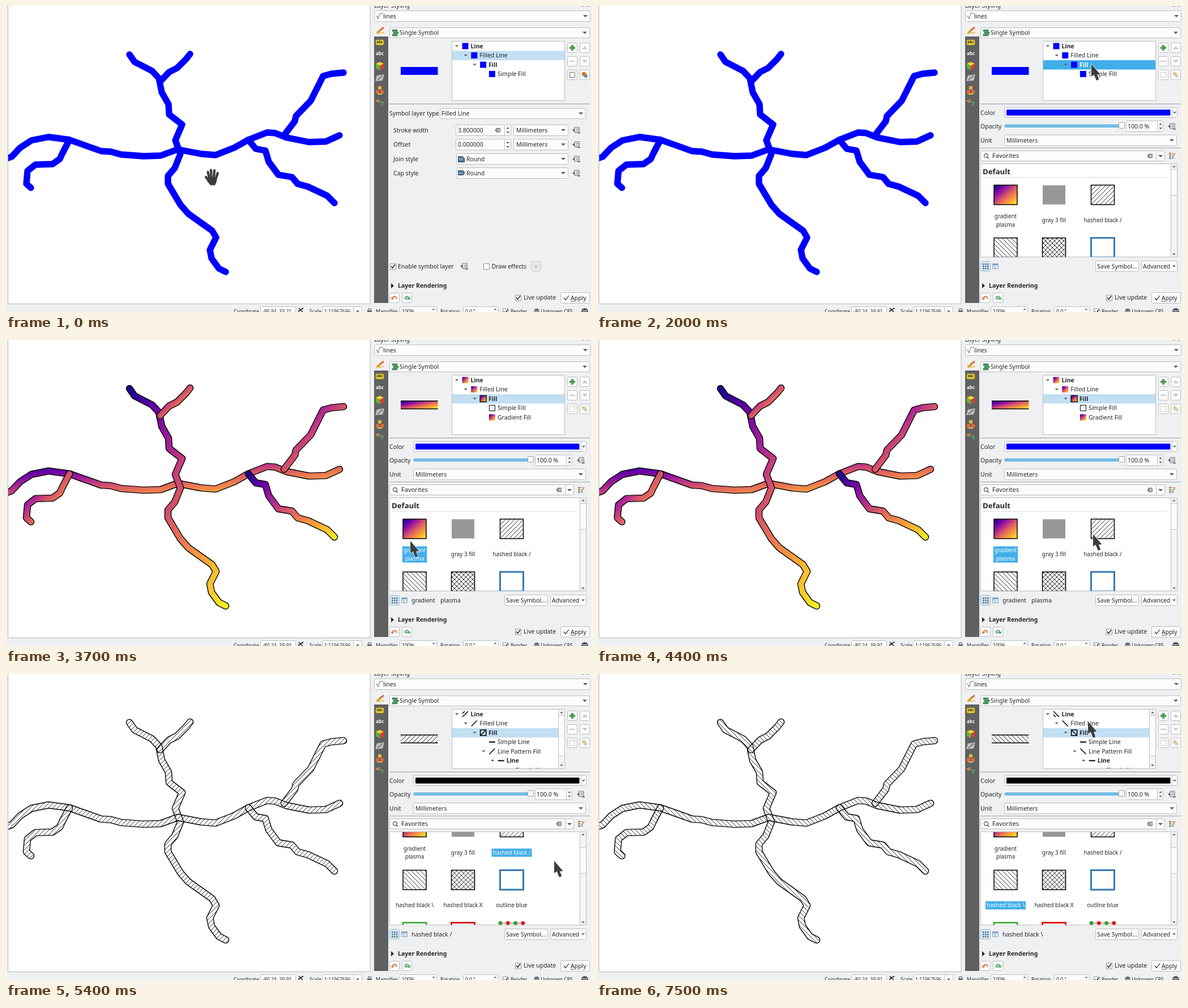
Write an HTML page with a canvas that moves like this. It is 1033 by 542 pixels and loops after 8000 ms.

```html
<!DOCTYPE html>
<html lang="en">
<head>
<meta charset="utf-8">
<title>Line styling</title>
<style>
html, body { margin: 0; width: 100%; height: 100%; overflow: hidden; background: #eff0f1; }
canvas { display: block; }
</style>
</head>
<body>
<canvas id="stage" width="1033" height="542"></canvas>
<script>
const W = 1033, H = 542, LOOP = 8000;
const stage = document.getElementById('stage').getContext('2d');
let g = stage;

const INK = '#232629', EDGE = '#bcbec0', BLUE = '#0000ff', ACCENT = '#41aeea', PALE = '#c2dff3';
const PLASMA = [[0, '#0d0887'], [.2, '#6a00a8'], [.38, '#b12a90'], [.5, '#d55468'],
  [.62, '#ea7853'], [.78, '#fca636'], [1, '#f0f921']];

// Rivers as flat x, y lists
const main = [-4,272, 10,267, 25,251, 45,238, 75,232, 112,237, 168,257, 185,258, 203,263, 243,266, 273,265,
  303,254, 345,262, 370,264, 403,251, 428,237, 461,224, 475,225, 495,233, 535,241, 565,240, 589,229];
const north = [218,86, 227,99, 258,115, 270,128, 275,153, 287,174, 288,192, 311,210, 299,238, 308,262, 298,287,
  286,301, 286,315, 308,352, 322,368, 364,398, 371,410, 360,432, 363,447, 376,465, 388,471];
const fork = [325,85, 318,94, 302,110, 288,117, 272,134];
const east = [596,118, 575,120, 560,124, 538,168, 512,195, 510,204, 491,229];
const south = [428,237, 441,253, 458,256, 464,276, 481,299, 505,303, 515,315, 533,320, 567,336, 580,349];
const west = [112,237, 99,262, 95,271, 82,280, 52,281, 38,292, 36,315, 44,322];
const rivers = [main, north, fork, east, south, west];

// Pointer stops: time, x, y
const stops = [[100,364,302], [1000,903,79], [1200,901,79], [1400,875,98], [1600,873,103], [2200,873,103],
  [2600,709,374], [2700,711,366], [3600,711,366], [3700,714,356], [4100,800,408], [4500,890,332], [4700,890,332],
  [5200,968,331], [5600,968,331], [6100,719,363], [6700,719,363], [7100,855,103], [7300,855,103], [7500,867,84]];

function pointerAt(t) {
  const i = stops.findIndex(s => s[0] > t);
  if (i === 0) return stops[0].slice(1);
  if (i < 0) return stops[stops.length - 1].slice(1);
  const [t0, x0, y0] = stops[i - 1], [t1, x1, y1] = stops[i];
  const u = (t - t0) / (t1 - t0), k = u * u * (3 - 2 * u);
  return [x0 + (x1 - x0) * k, y0 + (y1 - y0) * k];
}

function layer(w, h, paint) {
  const c = document.createElement('canvas'), outer = g;
  c.width = w; c.height = h;
  g = c.getContext('2d');
  paint();
  g = outer;
  return c;
}

function box(x, y, w, h, fill, stroke, width = 1, radius = 0) {
  g.beginPath();
  g.roundRect(x, y, w, h, radius);
  if (fill) { g.fillStyle = fill; g.fill(); }
  if (stroke) { g.strokeStyle = stroke; g.lineWidth = width; g.stroke(); }
}
function line(points, color = INK, width = 1, close = false) {
  g.beginPath();
  for (let i = 0; i < points.length; i += 2) g.lineTo(points[i], points[i + 1]);
  if (close) g.closePath();
  g.strokeStyle = color; g.lineWidth = width; g.stroke();
}
function poly(points, color) {
  g.beginPath();
  for (let i = 0; i < points.length; i += 2) g.lineTo(points[i], points[i + 1]);
  g.fillStyle = color; g.fill();
}
function dot(x, y, r, color) {
  g.beginPath(); g.arc(x, y, r, 0, 7); g.fillStyle = color; g.fill();
}
function text(s, x, y, { size = 10.5, bold = false, color = INK, align = 'left' } = {}) {
  g.font = `${bold ? 'bold ' : ''}${size}px "Noto Sans", sans-serif`;
  g.textAlign = align; g.fillStyle = color;
  g.fillText(s, x, y + size * .36);
}
function clipped(x, y, w, h, paint) {
  g.save();
  g.beginPath(); g.rect(x, y, w, h); g.clip();
  paint();
  g.restore();
}
const arrow = (x, y, d = 1, r = 4, color = '#55585b') => poly([x - r, y - d * r / 2, x + r, y - d * r / 2, x, y + d * r / 2], color);
const field = (x, y, w, h = 19) => box(x + .5, y + .5, w - 1, h - 1, '#fcfcfc', EDGE, 1, 2);
function combo(label, x, y, w, textX, h = 19) {
  field(x, y, w, h);
  text(label, textX, y + h / 2);
  arrow(x + w - 9, y + h / 2);
}
function checkbox(x, y, on) {
  box(x - 4.5, y - 4.5, 10, 10, '#fcfcfc', '#8f9294');
  if (on) line([x - 3, y, x - .5, y + 3, x + 4, y - 3], INK, 1.6);
}
function overrideIcon(x, y) {
  box(x - 3, y - 5, 8, 9, '#f7f7f7', '#606366');
  line([x - 1, y - 2, x + 4, y - 2], '#606366');
  line([x - 1, y + 1, x + 4, y + 1], '#606366');
  poly([x - 7, y, x - 3, y - 3, x - 3, y + 3], '#606366');
  line([x + 2, y + 5, x + 7, y + 5], '#606366', 1.5);
}

// Fills
function plasma(x, y, w, h) {
  const gx = .5 / w, gy = .5 / h, n = gx * gx + gy * gy;
  const fill = g.createLinearGradient(x, y, x + gx / n, y + gy / n);
  PLASMA.forEach(([at, color]) => fill.addColorStop(at, color));
  return fill;
}
function hatch(kind) {
  return g.createPattern(layer(8, 8, () => {
    if (kind === 'back') { g.translate(8, 0); g.scale(-1, 1); }
    for (const s of [0, 8, 16]) line([s - 10, 10, s + 2, -2].map((v, i) => i % 2 ? v : v), INK, 1);
  }), 'repeat');
}
function paintHatch(x, y, w, h, kinds) {
  clipped(x, y, w, h, () => kinds.forEach(k => { g.fillStyle = hatch(k); g.fillRect(x, y, w, h); }));
}

// River maps, one per style
function strokeRiver(points, style, width) {
  g.lineCap = g.lineJoin = 'round';
  line(points, style, width);
}
function riverMap(style) {
  return layer(W, H, () => rivers.forEach(points => {
    if (style === 'blue') return strokeRiver(points, BLUE, 11.4);
    const part = layer(W, H, () => {
      strokeRiver(points, '#000', 12.6);
      g.globalCompositeOperation = 'destination-out';
      strokeRiver(points, '#000', 9.8);
      g.globalCompositeOperation = 'destination-over';
      let fill;
      if (style === 'plasma') {
        const xs = points.filter((_, i) => i % 2 === 0), ys = points.filter((_, i) => i % 2);
        const x = Math.min(...xs) - 6, y = Math.min(...ys) - 6;
        fill = plasma(x, y, Math.max(...xs) + 6 - x, Math.max(...ys) + 6 - y);
      } else fill = hatch(style);
      strokeRiver(points, fill, 11);
    });
    g.drawImage(part, 0, 0);
  }));
}
const maps = {};
for (const style of ['blue', 'plasma', 'slash', 'back']) maps[style] = riverMap(style);

function drawMap(style) {
  box(3.5, -2, 639.5, 529.5, '#fff', '#b4b6b8');
  clipped(4, 0, 639, 527, () => g.drawImage(maps[style], 0, 0));
}

function drawToolStrip() {
  box(650, 54, 25, 472, '#5f6061');
  line([655, 48, 661, 43], '#d9a520', 4);
  line([660, 43, 667, 38], '#d8683c', 3);
  line([654, 49, 668, 47], '#e3bb4b', 1.5);
  box(653, 60, 14, 9, '#f4d93a', '#b79b1b', 1, 2);
  text('abc', 660, 64, { size: 6.5, bold: true, align: 'center' });
  text('abc', 660, 84, { size: 8, bold: true, color: '#fff', align: 'center' });
  poly([660, 99, 667, 102, 660, 106, 653, 102], '#f3d42d');
  poly([653, 102, 660, 106, 660, 114, 653, 110], '#55b83d');
  poly([667, 102, 660, 106, 660, 114, 667, 110], '#dc3d33');
  poly([655, 123, 668, 121, 665, 132, 652, 133], '#bfc1c2');
  line([656, 131, 665, 123], '#77797b', 2);
  box(657, 142, 6, 6, '#e9b13d'); box(653, 149, 6, 6, '#dd6a35'); box(661, 149, 6, 6, '#dd6a35');
  line([656, 156, 664, 156], '#e7c64a', 2);
  line([660, 166, 654, 168, 659, 171], '#e08a3e', 2);
  line([660, 169, 666, 171, 663, 176], '#5caa65', 2);
}

function symbolIcon(x, y, style, framed) {
  const l = x - 5.5, t = y - 5.5;
  if (style === 'blue') return box(l, t, 11, 11, BLUE);
  if (style === 'plasma') return box(l, t, 11, 11, plasma(l, t, 11, 11), framed && '#000', 1.4);
  const d = style === 'slash' ? 1 : -1;
  if (framed) box(l + .5, t + .5, 10, 10, null, '#000', 1.6);
  line([x - 5 * d, y + 5, x + 5 * d, y - 5], '#000', 1.5);
}

function drawTree(style, row, strong) {
  box(787.5, 62.5, 199, 105, '#fff', EDGE);
  const hatched = style === 'slash' || style === 'back';
  const rowY = i => 71 + 16.5 * i, right = hatched ? 975 : 986;
  box(788, rowY(row) - 8, right - 788, 16.5, strong ? ACCENT : PALE);
  clipped(788, 63, right - 788, 104.5, () => {
    const entry = (label, i, depth, icon, bold, open = true) => {
      const x = 811 + 15.8 * depth, y = rowY(i);
      if (open) arrow(x - 15, y, 1, 3.2);
      icon(x, y);
      text(label, x + 9.5, y, { bold, color: strong && i === row ? '#fff' : INK });
    };
    const symbol = framed => (x, y) => symbolIcon(x, y, style, framed);
    const dash = (x, y) => line([x - 5.5, y, x + 5.5, y], '#000', 1.8);
    entry('Line', 0, 0, (x, y) => {
      symbol(false)(x, y);
      if (hatched) { const d = style === 'slash' ? 1 : -1; line([x - 5, y - d * 1, x - 1, y - d * 5], '#000', 1.5); }
    }, true);
    entry('Filled Line', 1, 1, symbol(false));
    entry('Fill', 2, 2, symbol(true), true);
    if (style === 'blue') entry('Simple Fill', 3, 3, symbol(false), false, false);
    else if (style === 'plasma') {
      entry('Simple Fill', 3, 3, (x, y) => box(x - 5, y - 5, 10, 10, '#fff', '#000'), false, false);
      entry('Gradient Fill', 4, 3, symbol(false), false, false);
    } else {
      entry('Simple Line', 3, 3, dash, false, false);
      entry('Line Pattern Fill', 4, 3, symbol(false));
      entry('Line', 5, 4, dash, true);
      entry('Simple Line', 6, 5, dash, false, false);
    }
  });
  if (hatched) {
    box(975.5, 62.5, 11, 105, '#f5f5f5', EDGE);
    box(975.5, 73.5, 11, 72, '#fcfcfc', EDGE);
    arrow(981, 68, -1, 2.8); arrow(981, 162, 1, 2.8);
  }
}

function drawPreview(style) {
  const x = 697, y = 108, w = 65.5, h = 14;
  if (style === 'blue') return box(x, y, w, h, BLUE);
  if (style === 'plasma') box(x, y, w, h, plasma(x, y, w, h));
  else paintHatch(x, y, w, h, [style]);
  line([x, y, x + w, y], '#000', 1.6);
  line([x, y + h, x + w, y + h], '#000', 1.6);
}

function drawTreeButtons(locked) {
  for (const x of [1000, 1022]) for (const y of [74, 98, 122]) field(x - 9, y - 9, 18, 18);
  line([995, 74, 1005, 74], '#4f9f51', 4); line([1000, 69, 1000, 79], '#4f9f51', 4);
  line([995, 98, 1005, 98], '#cfd1d2', 2.5);
  arrow(1022, 74, -1, 5, '#c3c5c7'); arrow(1022, 98, 1, 5, '#c3c5c7');
  g.globalAlpha = locked ? .3 : 1;
  box(995.5, 117.5, 9, 9, '#fff', '#65686b'); box(1002, 116, 3, 3, '#e2b936');
  dot(1021, 121, 4.5, '#e2b936'); dot(1020, 120, 2.5, '#d84a3f'); dot(1024, 124, 3, '#4f8bc4');
  g.globalAlpha = 1;
}

function drawLinePanel() {
  text('Symbol layer type', 677, 190.5);
  combo('Filled Line', 766, 181, 258, 769);
  [['Stroke width', 220, '3.800000'], ['Offset', 245.5, '0.000000']].forEach(([label, y, value], i) => {
    text(label, 684, y);
    field(794, y - 10, 98, 20);
    text(value, 798, y);
    line([880.5, y - 9, 880.5, y + 9], EDGE);
    arrow(886, y - 4, -1, 2.8); arrow(886, y + 4, 1, 2.8);
    if (!i) clearIcon(868, y);
    combo('Millimeters', 896, y - 10, 97, 901, 20);
    overrideIcon(1007, y);
  });
  [['Join style', 271], ['Cap style', 296]].forEach(([label, y], i) => {
    text(label, 684, y);
    combo('Round', 795, y - 10, 198, 813, 20);
    box(798.5, y - 4.5, 11, i ? 8 : 10, '#55799b', '#34495e', 1, i ? [0, 4, 4, 0] : [0, 5, 0, 0]);
    line([799, y, 807, y], '#c9dbe8');
    overrideIcon(1007, y);
  });
  checkbox(683, 461, true); text('Enable symbol layer', 692, 461);
  overrideIcon(809, 461);
  checkbox(848, 461, false); text('Draw effects', 857.5, 461);
  box(927.5, 452.5, 17, 17, '#e8e9ea', '#c8cacb', 1, 2);
  text('★', 936, 461, { size: 11, color: '#c9c4ae', align: 'center' });
}

function clearIcon(x, y) {
  poly([x - 5, y, x - 2, y - 4, x + 5, y - 4, x + 5, y + 4, x - 2, y + 4], '#8b8e91');
  line([x, y - 2, x + 3.5, y + 2], '#fff'); line([x, y + 2, x + 3.5, y - 2], '#fff');
}

const columns = [721.5, 807, 893];
function drawSwatches(scroll, chosen) {
  box(677.5, 279.5, 347, 165, '#fff', EDGE);
  clipped(678, 280, 336, 164.5, () => {
    g.translate(0, -scroll);
    text('Default', 681, 293.5, { size: 13.2, bold: true });
    line([681, 303.5, 1008, 303.5], '#dcddde');
    const [a, b, c] = columns, rows = [334.5, 428, 521.5];
    const frame = (x, y, fill, color = '#000', width = 1.5) => box(x - 20.5, y - 17.2, 41, 34.4, fill, color, width);
    const hatched = (x, y, kinds) => { paintHatch(x - 20.5, y - 17, 41, 34, kinds); frame(x, y); };
    frame(a, rows[0], plasma(a - 20, rows[0] - 17, 41, 34));
    box(b - 20, rows[0] - 17, 40, 34, '#979797');
    hatched(c, rows[0], ['slash']);
    hatched(a, rows[1], ['back']);
    hatched(b, rows[1], ['slash', 'back']);
    frame(c, rows[1], '#fff', '#3579b1', 3);
    frame(a, rows[2] - .5, '#fff', '#4daf4a', 3);
    frame(b, rows[2] - .5, '#fff', '#e31a1c', 3);
    box(c - 20, rows[2] - 17, 40, 34, null, '#555');
    for (let i = 0; i < 4; i++) dot(c - 20 + i * 13.3, rows[2] - 17, 3.4, i % 2 ? '#e31a1c' : '#33a02c');

    const label = (name, x, y, lines) => {
      const on = name === chosen, size = 9.9;
      g.font = `${size}px "Noto Sans", sans-serif`;
      if (on) {
        const w = Math.max(...lines.map(s => g.measureText(s).width)) + 4, h = lines.length * 14.4;
        box(x - w / 2, y - h / 2, w, h, ACCENT);
      }
      lines.forEach((s, i) => text(s, x, y + (i - (lines.length - 1) / 2) * 14.4, { size, align: 'center', color: on ? '#fff' : INK }));
    };
    label('plasma', a, 379.8, ['gradient', 'plasma']);
    label('gray', b, 379.8, ['gray 3 fill']);
    label('slash', c, 379.8, ['hashed black /']);
    label('back', a, 473, ['hashed black \\']);
    label('cross', b, 473, ['hashed black X']);
    label('outline', c, 473, ['outline blue']);
  });
  box(1013.5, 279.5, 11, 165, '#f5f5f5', EDGE);
  box(1013.5, 289.5 + scroll * .28, 11, 46, '#fcfcfc', EDGE);
  arrow(1019, 284, -1, 2.8); arrow(1019, 440, 1, 2.8);
}

function drawFillPanel(color, scroll, chosen) {
  text('Color', 677, 189);
  field(719, 179, 306, 19);
  box(723, 183.5, 289.5, 10.5, color, null, 0, 1);
  line([1015.5, 180, 1015.5, 197], EDGE); arrow(1020, 189, 1, 3);
  text('Opacity', 677, 213);
  box(720, 210.5, 206, 4, '#7cc4ee', '#3d9fd4', 1, 2);
  box(921.5, 206.5, 10, 10, '#fcfcfc', '#9a9c9e', 1, 1);
  field(934, 203, 66, 20);
  text('100.0 %', 937, 213);
  line([989.5, 204, 989.5, 222], EDGE);
  arrow(995, 209, -1, 2.8); arrow(995, 217, 1, 2.8);
  overrideIcon(1015, 213);
  text('Unit', 677, 238);
  combo('Millimeters', 719, 228, 305, 723, 20);
  line([677, 251.5, 1031, 251.5], '#a5a7a9');
  field(677, 256, 326, 19);
  g.beginPath(); g.arc(687, 265, 3.4, 0, 7); g.strokeStyle = '#55585b'; g.lineWidth = 1.2; g.stroke();
  line([689, 267.5, 692, 270.5], '#55585b', 1.4);
  text('Favorites', 698, 265.5, { size: 11 });
  clearIcon(976, 265.5);
  line([987.5, 257, 987.5, 274], EDGE); arrow(995, 266);
  for (let i = 0; i < 3; i++) {
    box(1010.5, 260 + i * 4, 3, 3, ['#d65a3e', '#4d9d58', '#4f83b8'][i]);
    line([1015, 261.5 + i * 4, 1019, 261.5 + i * 4], '#77797b');
  }
  line([1015, 270, 1021, 261], '#d99a3e', 2);
  drawSwatches(scroll, chosen);

  box(677.5, 452.5, 17, 17, '#dcebf5', '#93b5cd', 1, 2);
  for (let i = 0; i < 9; i++) box(681 + i % 3 * 4, 456 + (i / 3 | 0) * 4, 2.6, 2.6, '#4b7094');
  box(698.5, 456.5, 10, 9, '#dbe6f2', '#8ba7c6');
  box(698.5, 456.5, 10, 2.5, '#7e9fc4'); line([702.5, 457, 702.5, 465], '#8ba7c6');
  if (chosen === 'plasma') { text('gradient', 716, 461); text('plasma', 767, 461); }
  else if (chosen) text(`hashed black ${chosen === 'slash' ? '/' : '\\'}`, 716, 461);
  field(880, 451, 77, 20); text('Save Symbol…'.replace('…', '...'), 883, 461);
  field(961, 451, 64, 20); text('Advanced', 964, 461); arrow(1019, 461, 1, 3);
}

function curvedArrow(x, y, d, color) {
  g.beginPath(); g.arc(x, y + 2, 3.6, Math.PI, 0); g.lineTo(x + d * 3.6, y + 3);
  g.strokeStyle = color; g.lineWidth = 2; g.stroke();
  poly([x - d * 7, y + 1, x - d * .5, y + 1, x - d * 3.8, y + 5], color);
}

function drawFrame() {
  text('Layer Styling', 650, -1);
  line([1016, 0, 1021, 0], '#55585b'); line([1025, 0, 1030, 0], '#55585b');
  combo('lines', 650, 8, 382, 666, 20);
  line([653, 18, 655, 18, 657, 23, 660, 13, 666, 13], '#6a6d70');
  combo('Single Symbol', 677, 38, 354, 695);
  for (const y of [43, 47, 51]) box(682 + (y === 47 ? 2 : 0), y - 1, 9, 3, '#3d9a57', '#2b6f3f', .7);
  line([677, 173.5, 1031, 173.5], '#97999b');

  poly([680, 491, 685, 495.5, 680, 500], INK);
  text('Layer Rendering', 692, 495.5, { bold: true });
  field(677, 508, 18, 18); curvedArrow(686, 516, 1, '#dd7a39');
  field(699, 508, 18, 18); curvedArrow(708, 516, -1, '#55a565');
  checkbox(904, 516.5, true); text('Live update', 914, 516.5);
  field(979, 507, 52, 20);
  line([985, 517, 988, 520.5, 994, 513], INK, 1.2);
  text('Apply', 997, 517); line([997, 523, 1003, 523], INK, .8);
}

function drawStatus([x, y]) {
  const small = { size: 8.6 }, mid = 540.8;
  const boxed = (s, l, w) => { field(l, 532, w, 18); text(s, l + 4, mid, small); };
  const lon = -95.94 + (x - 364) * .05627, lat = 33.21 + (302 - y) * .05627;
  const outside = x > 643;
  text('Coordinate', 402, mid, small);
  boxed(outside ? '-80.24, 39.92' : `${lon.toFixed(2)}, ${lat.toFixed(2)}`, 449, 63);
  line([516, 541, 525, 535], INK, 2); line([517, 535, 524, 542], INK, 1.5);
  text('Scale', 536, mid, small);
  boxed('1:11967696', 558, 71); line([613.5, 533, 613.5, 542], EDGE); arrow(621, 541, 1, 3);
  box(638, 539, 8, 5, '#6a6d70');
  g.beginPath(); g.arc(642, 538.5, 2.6, Math.PI, 0); g.strokeStyle = '#6a6d70'; g.lineWidth = 1.3; g.stroke();
  text('Magnifier', 653, mid, small);
  boxed('100%', 695, 66); arrow(755, 537, -1, 2.6);
  text('Rotation', 767, mid, small);
  boxed('0.0 °', 807, 63); arrow(864, 537, -1, 2.6);
  checkbox(882, 541, true); text('Render', 891, mid, small);
  dot(937, 540.5, 4.8, '#686b6e'); line([932, 540.5, 942, 540.5], '#eff0f1', .7);
  text('Unknown CRS', 944.5, mid, small);
  dot(1022, 541, 6, '#55585b');
  for (const d of [-3, 0, 3]) dot(1022 + d, 540, .9, '#fff');
}

function drawHand(x, y) {
  g.save();
  g.translate(x, y);
  g.lineCap = g.lineJoin = 'round';
  for (const [color, grow] of [['#fff', 1.6], ['#3b3e41', 0]]) {
    for (const [x0, y0, x1, y1] of [[-5, 4, -7.5, -8], [-1.5, 2, -2, -11.5], [3, 2, 4, -11], [6.5, 4, 9.8, -6], [-5, 9, -11, 1]])
      line([x0, y0, x1, y1], color, 4.2 + grow);
    poly([-7, 1, 8.5, 1, 8, 9, 5, 15.5, -3, 15.5, -9, 8], color);
  }
  g.restore();
}
function drawArrowPointer(x, y) {
  const shape = [0, 0, 0, 22, 4.6, 18.6, 9, 29, 13.4, 27, 9.8, 18.4, 15.6, 18];
  g.save();
  g.translate(x, y);
  g.lineJoin = 'round';
  line(shape, 'rgba(255,255,255,.85)', 1.6, true);
  poly(shape, '#3b3e41');
  g.restore();
}

function draw(t) {
  const pointer = pointerAt(t);
  const style = t < 3000 ? 'blue' : t < 4600 ? 'plasma' : t < 6200 ? 'slash' : 'back';
  const chosen = t < 2900 ? '' : t < 4500 ? 'plasma' : t < 6100 ? 'slash' : 'back';
  const fillPanel = t >= 1900;

  g.lineCap = 'butt'; g.lineJoin = 'miter';
  box(0, 0, W, H, '#eff0f1');
  drawMap(style);
  drawToolStrip();
  drawFrame();
  drawPreview(style);
  drawTree(style, t < 1800 ? 1 : 2, t >= 1100 && t < 2900);
  drawTreeButtons(fillPanel);
  if (fillPanel) drawFillPanel(t < 4600 ? BLUE : '#000', t < 5400 ? 0 : 63.3, chosen);
  else drawLinePanel();
  drawStatus(pointer);
  (pointer[0] < 643 ? drawHand : drawArrowPointer)(...pointer);
}

let shown = -1;
function tick() {
  const t = Math.floor(performance.now() % LOOP / 100) * 100;
  if (t !== shown) draw(shown = t);
  requestAnimationFrame(tick);
}
document.fonts.ready.then(() => { shown = -1; });
tick();
</script>
</body>
</html>
```
